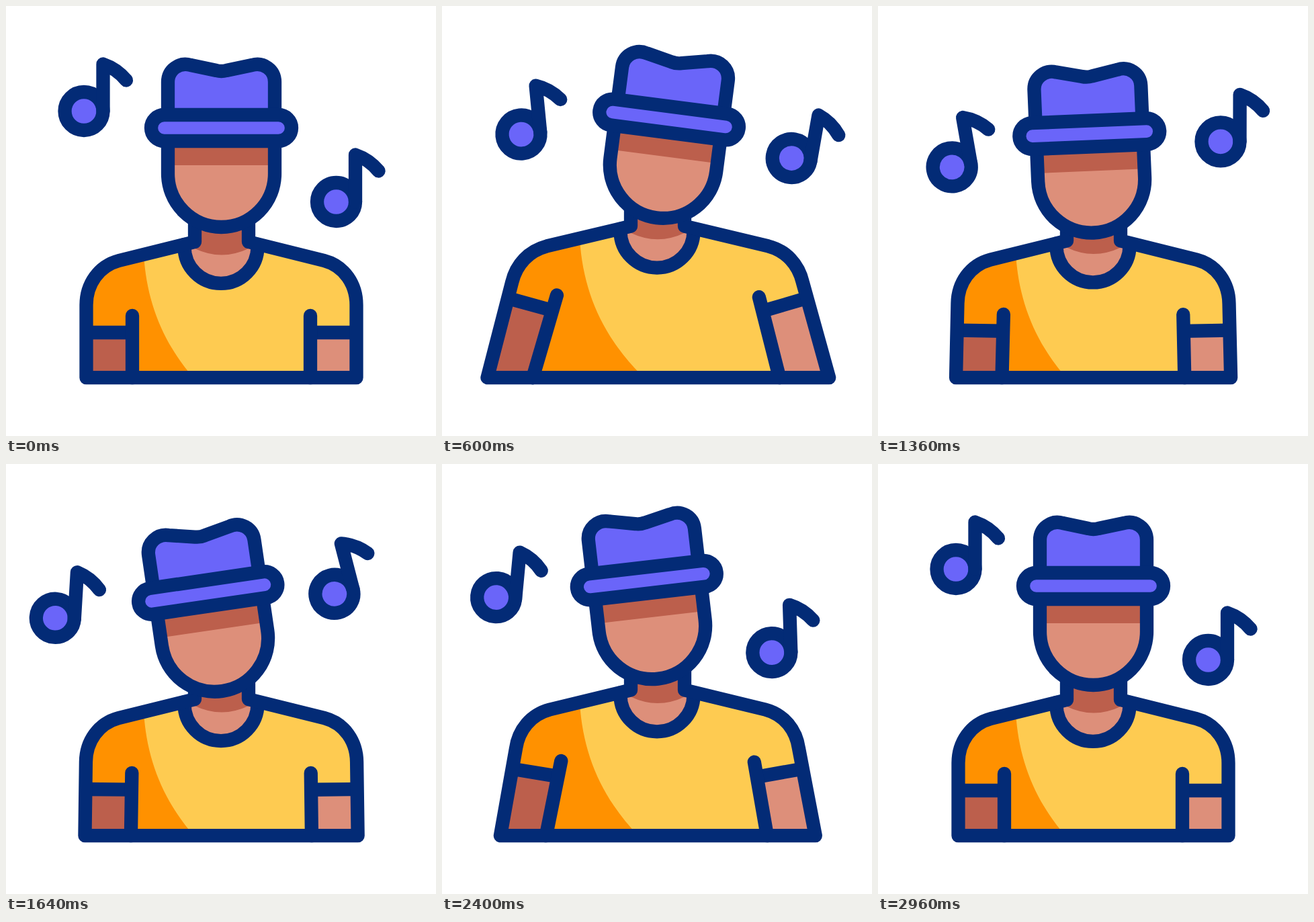
These frames come from a looping animation (640 by 640 pixels, 3 s). An HTML page:

```html
<!DOCTYPE html>
<html lang="en">
<head>
<meta charset="utf-8">
<title>Dancing man</title>
<style>
  html, body { margin: 0; width: 100%; height: 100%; overflow: hidden; background: #fff; }
  svg { display: block; width: 100vw; height: 100vh; }
  .line { fill: none; stroke: #032b76; stroke-width: 20.3; stroke-linejoin: round; }
  .round { stroke-linecap: round; }
  .violet { fill: #6a65f9; }
  .skin { fill: #dd8f7a; }
  .shade { fill: #bc5f4c; }
  .shirt { fill: #fecb51; }
  .fold { fill: #ff9100; }
</style>
</head>
<body>
<svg viewBox="0 0 640 640">
  <defs>
    <clipPath id="torso"><path id="torsoClip"/></clipPath>
    <g id="note">
      <circle class="line violet" r="28.5"/>
      <path class="line round" d="M28.5 0V-70Q49 -63 63 -46"/>
    </g>
  </defs>

  <use id="noteL" href="#note"/>
  <use id="noteR" href="#note"/>

  <path id="shirt" class="shirt"/>
  <g clip-path="url(#torso)">
    <path id="fold" class="fold" d="M205 340V370C210 450 240 515 296 572V600H0V340Z"/>
  </g>
  <path id="armL" class="shade"/>
  <path id="armR" class="skin"/>
  <g id="neck">
    <path class="skin" d="M281 322H361V351L374.5 358A54.5 54.5 0 0 1 265.5 358L281 351Z"/>
    <path class="shade" d="M281 322H361V361Q321 380 281 361Z"/>
    <path class="line round" d="M265.5 355V358.5A54.5 54.5 0 0 0 374.5 358.5V355"/>
  </g>
  <path id="sleeves" class="line"/>
  <path id="seams" class="line round"/>
  <path id="outline" class="line"/>

  <g id="head">
    <path class="skin" d="M241 195V249.5A79.5 79.5 0 0 0 400 249.5V195Z"/>
    <path class="shade" d="M241 195H400V237H241Z"/>
    <path class="line" d="M241 195V249.5A79.5 79.5 0 0 0 400 249.5V195"/>
    <path class="line violet"
      d="M241 165V113C241 95 258 83 275 88L313 96Q320.5 98 328 96L366 88C383 83 400 95 400 113V165"/>
    <rect class="line violet" x="216" y="162" width="209" height="39" rx="19.5"/>
  </g>
</svg>
<script>
const LOOP = 3000, STEP = 40;
const $ = id => document.getElementById(id);

// Each row: time, then the values reached at that time.
const tracks = {
  lift:  [[160, 0], [860, 1], [1570, 0], [2180, 1], [2855, 0]].map(k => k),
  headY: [[160, 0], [860, -15.2], [1570, 10], [2180, -16], [2870, 0]],
  tilt:  [[160, 0], [870, 8.3], [2180, -10.9], [2890, 0]],
  noteL: [[360, 116, 156.5, 0], [1130, 121, 243, -13.9], [2170, 58.5, 225, 8.8], [2920, 116, 156.5, 0]],
  noteR: [[80, 491.5, 291.5, 0], [1100, 528, 209, 12.7], [1910, 485.5, 192, -16.9], [2700, 491.5, 291.5, 0]]
};

// Cubic bezier (.4, 0, .2, 1), solved by bisection.
function ease(x) {
  let lo = 0, hi = 1, s = x;
  for (let i = 0; i < 24; i++) {
    s = (lo + hi) / 2;
    const r = 1 - s;
    if (1.2 * s * r * r + 0.6 * s * s * r + s * s * s < x) lo = s; else hi = s;
  }
  return s * s * (3 - 2 * s);
}

function sample(track, t) {
  const next = track.findIndex(k => k[0] > t);
  if (next === 0) return track[0].slice(1);
  if (next < 0) return track[track.length - 1].slice(1);
  const a = track[next - 1], b = track[next];
  const k = ease((t - a[0]) / (b[0] - a[0]));
  return a.slice(1).map((v, i) => v + (b[i + 1] - v) * k);
}

function drawBody(p) {
  // A point at rest plus its shift when fully raised.
  const at = (x, y, dx, dy) => `${(x + dx * p).toFixed(2)} ${(y + dy * p).toFixed(2)} `;
  const set = (id, d) => $(id).setAttribute('d', d);

  const footL = at(119.5, 553.2, -58, 0), footR = at(521.5, 553.2, 61, 0);
  const cuffL = at(119.5, 486, -24, -57), cuffR = at(521.5, 486, 24, -57);
  const pitL = at(188, 486, -31, -38), pitR = at(453, 486, 28, -36);
  const seamL = at(188, 553.2, -59, 0), seamR = at(453, 553.2, 55, 0);

  const body = 'M' + at(281, 322, 0, -26) + 'L' + at(281, 351, 0, -26) +
    'L' + at(168, 379, -13.5, -24) +
    'C' + at(138, 387, -10, -25) + at(119.5, 414, -10, -33) + at(119.5, 445, -17, -38) +
    'L' + footL + 'L' + footR + 'L' + at(521.5, 445, 17, -38) +
    'C' + at(521.5, 414, 10, -33) + at(503.5, 387, 10, -25) + at(473.5, 379, 13.5, -24) +
    'L' + at(361, 351, 0, -26) + 'L' + at(361, 322, 0, -26);

  for (const id of ['shirt', 'torsoClip', 'outline']) set(id, body);
  set('armL', `M${footL}L${cuffL}L${pitL}L${seamL}Z`);
  set('armR', `M${footR}L${cuffR}L${pitR}L${seamR}Z`);
  set('sleeves', `M${cuffL}L${pitL}M${cuffR}L${pitR}`);
  set('seams', `M${at(188, 461, -19, -34)}L${seamL}M${at(453, 461, 21, -31)}L${seamR}`);

  for (const id of ['neck', 'fold']) $(id).setAttribute('transform', `translate(0 ${-26 * p})`);
}

function draw(t) {
  drawBody(sample(tracks.lift, t)[0]);
  const [y] = sample(tracks.headY, t), [tilt] = sample(tracks.tilt, t);
  $('head').setAttribute('transform', `translate(0 ${y}) rotate(${tilt} 320.5 318)`);
  for (const id of ['noteL', 'noteR']) {
    const [nx, ny, turn] = sample(tracks[id], t);
    $(id).setAttribute('transform', `translate(${nx} ${ny}) rotate(${turn})`);
  }
}

const start = performance.now();
function tick() {
  const t = (performance.now() - start) % LOOP;
  draw(Math.floor(t / STEP) * STEP);
  requestAnimationFrame(tick);
}
tick();
</script>
<style>
  .line.violet { fill: #6a65f9; }
</style>
</body>
</html>
```
